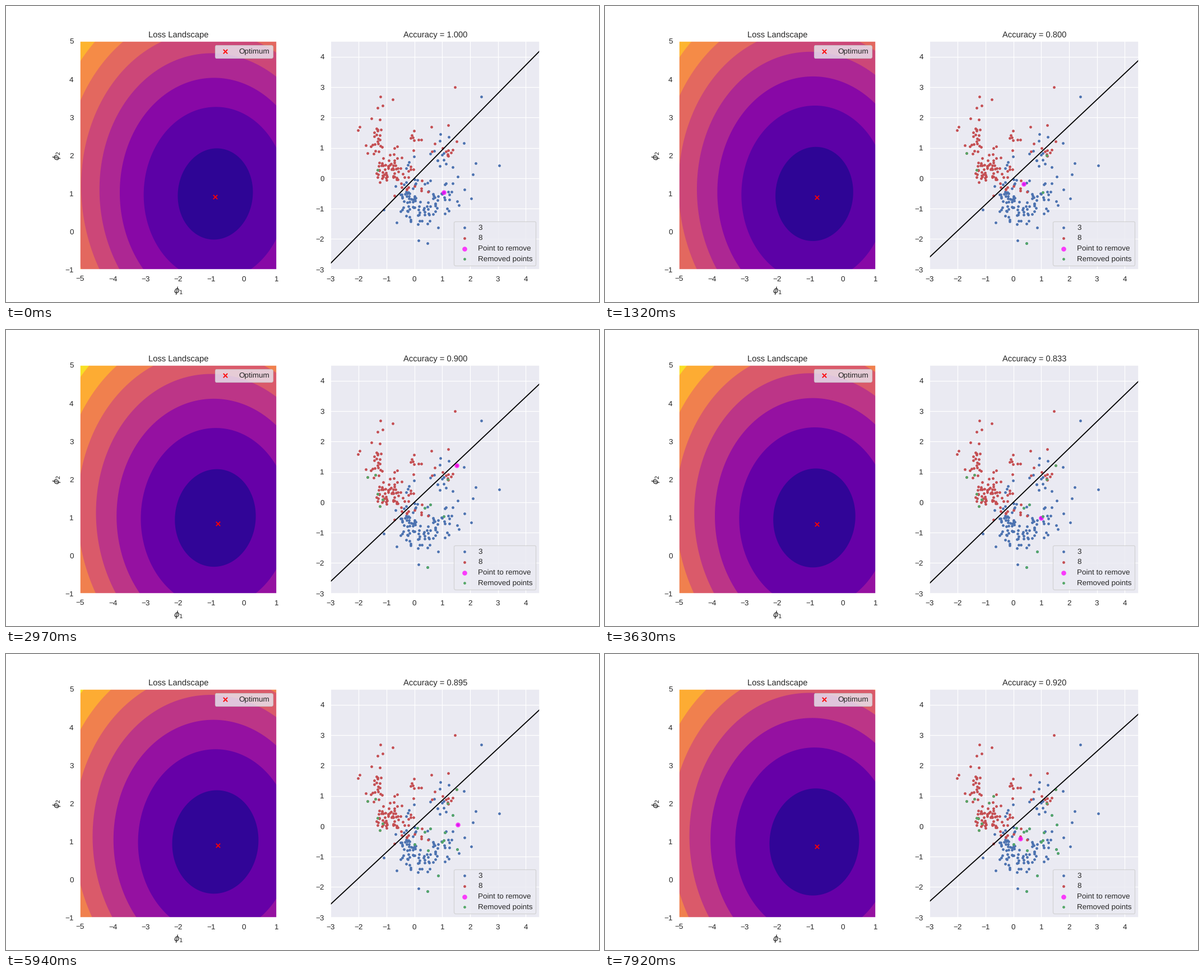
Write a matplotlib script that moves like this. It is 1058x529 px and loops after 8000 ms.

```python
import numpy as np
import matplotlib.pyplot as plt
from matplotlib.animation import FuncAnimation
from matplotlib.patches import Polygon

DPI = 92
W, H = 1058, 529
SCALE = 11.5 / 12          # design width is 12 inches
LOOP, TICK, STEP = 8000, 40, 330
LAST = LOOP // STEP
BLUE, RED, GREEN, MAGENTA = "#4C72B0", "#C44E52", "#55A868", "#FF00FF"

plt.rcParams.update({
    "font.family": "Liberation Sans",
    "mathtext.fontset": "dejavusans",
    "text.hinting": "none",
    "text.color": "0.15",
    "axes.labelcolor": "0.15",
    "axes.facecolor": "#EAEAF2",
    "axes.edgecolor": "white",
    "axes.linewidth": 1.25 * SCALE,
    "axes.axisbelow": True,
    "axes.grid": True,
    "axes.labelsize": 12 * SCALE,
    "axes.labelpad": 4 * SCALE,
    "axes.titlesize": 12 * SCALE,
    "axes.titlepad": 6 * SCALE,
    "grid.color": "white",
    "grid.linewidth": 1 * SCALE,
    "legend.fontsize": 11 * SCALE,
    "legend.framealpha": 0.8,
    "legend.edgecolor": "0.8",
    "patch.linewidth": 1 * SCALE,
})
for axis in ("xtick", "ytick"):
    plt.rcParams.update({
        f"{axis}.color": "0.15",
        f"{axis}.labelsize": 11 * SCALE,
        f"{axis}.major.size": 0,
        f"{axis}.major.pad": 9.5 * SCALE,
    })

# --- data -----------------------------------------------------------------
# points in the order they are removed
removal = np.array([
    (-1.32, .28), (1.06, -.47), (-1.68, .83), (.48, -2.13), (1.20, .75),
    (.37, -.19), (.57, -.08), (-1.13, .09), (-1.41, .90), (-1.24, -.13),
    (1.52, 1.21), (.85, -1.63), (1.00, -.51), (.50, -.80), (1.54, -.75),
    (1.10, -.20), (1.38, .37), (.11, -.06), (.01, -.59), (1.56, .05),
    (-.72, 1.00), (-.88, .77), (1.60, -.88), (.47, -.15), (-1.25, .25),
    (.26, -.41),
])
misclassified = np.isin(np.arange(len(removal)), [4, 10, 25])
is_red = (removal[:, 1] > .88 * removal[:, 0]) ^ misclassified
rng = np.random.default_rng(3)


def cluster(n, cx, cy, rx, ry):
    """n points peaking at the centre, none farther out than rx, ry."""
    return [cx, cy] + rng.triangular(-1, 0, 1, (n, 2)) * [rx, ry]


red = np.vstack([
    removal[is_red],
    [(1.46, 3.00), (-1.22, 2.69), (-.78, 2.60), (-1.14, 2.39), (-1.32, 2.32),
     (-1.96, 1.70), (-2.02, 1.59), (.62, 1.70), (1.21, 1.74)],
    cluster(12, -1.3, 1.55, .25, .55),
    cluster(10, -1.4, 1.0, .45, .35),
    cluster(22, -1.15, .25, .30, .55),
    cluster(26, -.75, .40, .45, .65),
    cluster(18, -.15, -.1, .65, .75),
    cluster(9, -.05, 1.15, .60, .55),
    cluster(9, 1.1, .85, .60, .60),
])
blue = np.vstack([
    removal[~is_red],
    [(2.41, 2.68), (.93, 1.45), (1.24, 1.36), (1.77, 1.16), (2.20, .49),
     (3.04, .43), (2.11, .13), (1.79, -.37), (2.04, -.66), (-1.10, -1.03),
     (-.64, -1.46), (.15, -2.05)],
    cluster(34, -.25, -.65, .50, .85),
    cluster(26, .25, -1.2, .60, .65),
    cluster(28, .90, -.70, .65, .75),
    cluster(10, .90, .75, .55, .60),
    cluster(4, -.2, .5, .25, .40),
])

# --- motion ---------------------------------------------------------------
keys = [0, 4, 7, 11, 15, 18, 24]
slopes = [.931, .863, .847, .886, .887, .853, .822]
opt_y = [.912, .897, .860, .831, .949, .897, .868]
CENTER = (-.869, .987)
theta = np.linspace(0, 2 * np.pi, 241)


def ring(k, g):
    """Outline of contour k (1 = innermost), widening as g goes 0 to 1."""
    r = np.sqrt(-1.9 + 3.085 * k + .13 * k * k + g * (.07 + .49 * k))
    tilt = .04 - .03 * (r - 1.15)
    x = CENTER[0] + r * (np.cos(theta) + tilt * np.sin(theta))
    y = CENTER[1] + r * (1.047 - .018 * g) * np.sin(theta)
    return np.column_stack([x, y])


# --- figure ---------------------------------------------------------------
fig = plt.figure(figsize=(W / DPI, H / DPI), dpi=DPI, facecolor="white")
width = .775 / 2.2
loss = fig.add_axes([.125, .11, width * .94, .77])
data = fig.add_axes([.9 - width, .11, width, .77])

loss.set(xlim=(-5, 1), ylim=(-1, 5), xticks=range(-5, 2), yticks=range(-1, 6),
         title="Loss Landscape", xlabel=r"$\phi_1$", ylabel=r"$\phi_2$")
loss.grid(False)
plasma = plt.get_cmap("plasma")
rings = {k: loss.add_patch(Polygon(ring(k, 0), lw=0, zorder=1))
         for k in range(8, 0, -1)}
optimum = loss.scatter([0], [0], marker="x", color="red", s=36 * SCALE ** 2,
                       linewidths=1.5 * SCALE, zorder=2, label="Optimum")
loss.legend(loc="upper right", facecolor="#EAEAF2")

data.set(xlim=(-3, 4.5), ylim=(-3, 4.5),
         xticks=range(-3, 5), yticks=range(-3, 5))
title = data.set_title("")


def dots(points, color, label, diameter=4.8, **kw):
    size = (diameter * 72 / DPI) ** 2
    return data.scatter(*np.transpose(points), s=size, color=color,
                        linewidths=0, label=label, **kw)


dots(blue, BLUE, "3")
dots(red, RED, "8")
target = dots(removal[:1], MAGENTA, "Point to remove", 8.6, alpha=.75)
removed = dots(removal[:1], GREEN, "Removed points")
boundary, = data.plot([], [], color="black", lw=1.5 * SCALE)
data.legend(loc="lower right")


def update(i):
    step = (i * TICK + TICK - 1) // STEP
    count = step + 1

    bands = 9 if step < 6 else 8
    loss.set_facecolor(plasma((bands - .5) / bands))
    for k, patch in rings.items():
        patch.set_visible(k < bands)
        patch.set_xy(ring(k, step / LAST))
        patch.set_facecolor(plasma((k - .5) / bands))
    optimum.set_offsets([[-.789 - .08 * np.exp(-step),
                          np.interp(step, keys, opt_y)]])

    accuracy = 1 - misclassified[:count].mean()
    title.set_text(f"Accuracy = {accuracy:.3f}")
    x = np.array([-3, 4.5])
    boundary.set_data(x, x * np.interp(step, keys, slopes))
    target.set_offsets(removal[count:count + 1])
    removed.set_offsets(removal[:count])
    return []


anim = FuncAnimation(fig, update, frames=LOOP // TICK, interval=TICK,
                     repeat=True, repeat_delay=0, blit=False)
plt.show()
```
